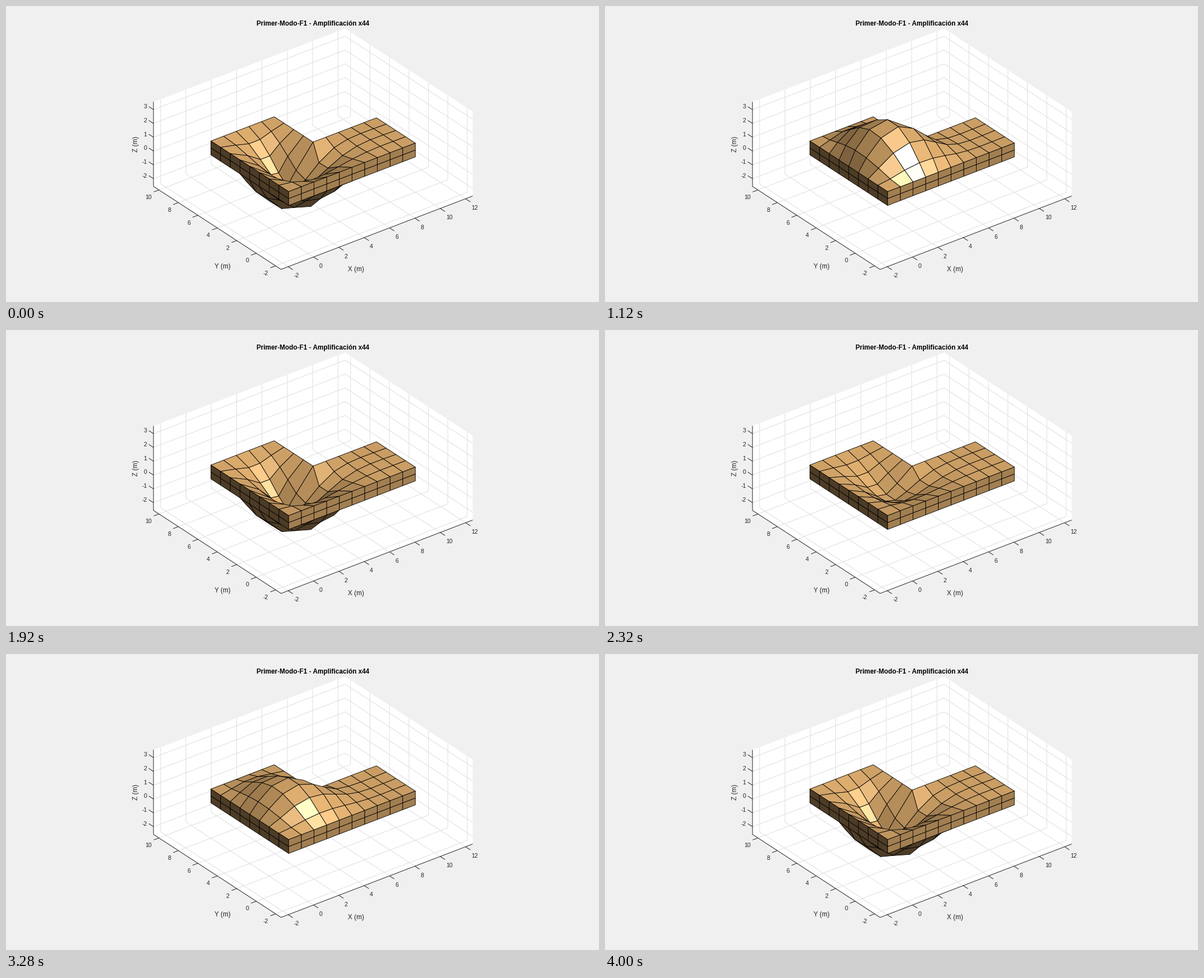
Recreate the animation shown at these times as a matplotlib script. Size 1058 by 529 pixels, loop 4080 ms.

```python
from itertools import product

import matplotlib.pyplot as plt
import numpy as np
from matplotlib.animation import FuncAnimation
from matplotlib.collections import LineCollection, PolyCollection

W, H, DPI = 1058, 529, 64
PX = 72 / DPI  # points per pixel
FRAMES, CYCLE, INTERVAL = 51, 25, 80

# Orthographic camera
SCALE = 28.5
CENTER = np.array([547.9, 255.5])
AZ, EL = np.radians([-37.5, 30])
RIGHT = np.array([np.cos(AZ), np.sin(AZ), 0])
UP = np.array([-np.sin(EL) * np.sin(AZ), np.sin(EL) * np.cos(AZ), np.cos(EL)])
VIEW = np.array([np.cos(EL) * np.sin(AZ), -np.cos(EL) * np.cos(AZ), np.sin(EL)])
MIDDLE = np.array([5, 4, 0.5])

# Light and material
LIGHT = np.array([0.1, -0.56, 0.815])
COPPER = np.array([1, 0.7812, 0.4975])
AMBIENT, DIFFUSE, SPECULAR, SHINE = 0.3, 0.6, 0.9, 10

INK = (0.15, 0.15, 0.15)
MARGIN = 2.56
SIZE = np.array([1, 1, 0.5])
LAYERS = 2


def project(p):
    q = (np.asarray(p, float) - MIDDLE) * SCALE
    return np.stack([CENTER[0] + q @ RIGHT, CENTER[1] - q @ UP], axis=-1)


# L-shaped plate of unit cells, two layers thick
cells = [(i, j) for i in range(10) for j in range(8) if i < 5 or j < 4]
plan = sorted({(i + a, j + b) for i, j in cells for a, b in product((0, 1), repeat=2)})
nodes = [(i, j, k) for i, j in plan for k in range(LAYERS + 1)]
index = {n: m for m, n in enumerate(nodes)}
rest = np.array(nodes) * SIZE


def is_inner(i, j):
    return all((i - a, j - b) in cells for a, b in product((0, 1), repeat=2))


def brick_stiffness(nu=0.25):
    """Stiffness of an eight-node brick, 2x2x2 Gauss points."""
    corners = np.array(list(product((-1, 1), repeat=3)))
    c = np.zeros((6, 6))
    c[:3, :3] = nu
    c[range(3), range(3)] = 1 - nu
    c[range(3, 6), range(3, 6)] = (1 - 2 * nu) / 2
    k = np.zeros((24, 24))
    for g in corners / np.sqrt(3):
        f = 1 + corners * g
        d = np.stack([corners[:, i] * f[:, (i + 1) % 3] * f[:, (i + 2) % 3]
                      / 4 / SIZE[i] for i in range(3)], axis=1)
        b = np.zeros((6, 24))
        for i in range(3):
            b[i, i::3] = d[:, i]
        for row, (i, j) in enumerate(((0, 1), (1, 2), (0, 2)), start=3):
            b[row, i::3] = d[:, j]
            b[row, j::3] = d[:, i]
        k += b.T @ c @ b
    return k


def first_mode():
    """Lowest vibration mode of the plate with a clamped rim."""
    n = len(nodes)
    stiff = np.zeros((3 * n, 3 * n))
    mass = np.zeros(n)
    brick = brick_stiffness()
    for (i, j), k in product(cells, range(LAYERS)):
        ids = [index[i + a, j + b, k + c] for a, b, c in product((0, 1), repeat=3)]
        dof = np.array([3 * m + d for m in ids for d in range(3)])
        stiff[np.ix_(dof, dof)] += brick
        mass[ids] += 1
    free = np.repeat([is_inner(i, j) for i, j, _ in nodes], 3)
    root = np.sqrt(np.repeat(mass, 3)[free])
    _, vecs = np.linalg.eigh(stiff[np.ix_(free, free)] / np.outer(root, root))
    shape = np.zeros(3 * n)
    shape[free] = vecs[:, 0] / root
    shape = shape.reshape(-1, 3)
    rise = shape[index[2, 3, 0]] @ UP * SCALE
    return shape * 57.1 / rise


def build_faces():
    """Outward-facing quads of the sides the camera can see."""
    quads = []
    for i, j in cells:
        ring = [(i, j), (i + 1, j), (i + 1, j + 1), (i, j + 1)]
        quads.append([index[a, b, LAYERS] for a, b in ring])
        quads.append([index[a, b, 0] for a, b in ring[::-1]])
        for k in range(LAYERS):
            if i == 0:
                quads.append([index[0, j, k], index[0, j, k + 1],
                              index[0, j + 1, k + 1], index[0, j + 1, k]])
            if j == 0:
                quads.append([index[i, 0, k], index[i + 1, 0, k],
                              index[i + 1, 0, k + 1], index[i, 0, k + 1]])
    return np.array(quads)


mode = first_mode()
faces = build_faces()


def shade(normal):
    lit = np.clip(normal @ LIGHT, 0, 1)
    mirror = np.clip(2 * lit * (normal @ VIEW) - LIGHT @ VIEW, 0, 1)
    gloss = SPECULAR * mirror ** SHINE
    rgb = COPPER * (AMBIENT + DIFFUSE * lit)[:, None] + gloss[:, None]
    return np.clip(rgb, 0, 1)


def pose(amp):
    """Visible quads from back to front, with their colours."""
    quads = (rest + amp * mode)[faces]
    normal = np.cross(quads[:, 2] - quads[:, 0], quads[:, 3] - quads[:, 1])
    normal /= np.linalg.norm(normal, axis=1, keepdims=True)
    order = np.argsort(quads.mean(axis=1) @ VIEW)
    order = order[(normal @ VIEW > 0)[order]]
    return project(quads[order]), shade(normal[order])


plt.rcParams["font.family"] = "Liberation Sans"
fig = plt.figure(figsize=(W / DPI, H / DPI), dpi=DPI, facecolor="#f0f0f0")
ax = fig.add_axes([0, 0, 1, 1])
ax.set(xlim=(0, W), ylim=(H, 0))
ax.axis("off")


def write(x, y, s, size=10.67, color=INK, **kw):
    ax.text(x, y + 0.36 * size, s, fontsize=size * PX, color=color,
            va="baseline", **kw)


def draw_axes():
    (x0, y0, z0), (x1, y1, z1) = -np.full(3, MARGIN), np.array([10, 8, 1]) + MARGIN
    hull = [(x0, y0, z0), (x1, y0, z0), (x1, y0, z1),
            (x1, y1, z1), (x0, y1, z1), (x0, y1, z0)]
    ax.add_patch(plt.Polygon(project(hull), fc="white", ec="none", zorder=0))

    grid, ticks = [], []

    def add_tick(at, out):
        p = project(at)
        step = project(np.add(at, out)) - p
        ticks.append([p, p + 10 * step / np.hypot(*step)])
        return p

    for x in range(-2, 13, 2):
        grid.append([(x, y0, z0), (x, y1, z0), (x, y1, z1)])
        p = add_tick((x, y0, z0), (0, -1, 0))
        write(p[0] + 10, p[1] + 15.5, str(x), ha="left")
    for y in range(-2, 11, 2):
        grid.append([(x0, y, z0), (x1, y, z0), (x1, y, z1)])
        p = add_tick((x0, y, z0), (-1, 0, 0))
        write(p[0] - 13, p[1] + 12.7, str(y), ha="right")
    for z in range(-2, 4):
        grid.append([(x0, y1, z), (x1, y1, z), (x1, y0, z)])
        p = add_tick((x0, y1, z), (0, 1, 0))
        write(p[0] - 11.7, p[1] - 5.8, str(z), ha="right")

    frame = project([(x1, y0, z0), (x0, y0, z0), (x0, y1, z0), (x0, y1, z1)])
    ax.add_collection(LineCollection([project(g) for g in grid], colors="#dfdfdf",
                                     linewidths=PX, zorder=1))
    ax.add_collection(LineCollection([frame] + ticks, colors=[INK],
                                     linewidths=PX, zorder=2))

    write(547.9, 30.5, "Primer-Modo-F1 - Amplificación x44", 11.75, "black",
          ha="center", weight="bold")
    write(624.5, 469.5, "X (m)", 11.73, ha="center")
    write(386, 464.5, "Y (m)", 11.73, ha="center")
    ax.text(232, 246.5, "Z (m)", fontsize=11.73 * PX, color=INK,
            ha="center", va="center", rotation=90)


draw_axes()
plate = PolyCollection([], edgecolors="black", linewidths=0.85 * PX, zorder=3)
ax.add_collection(plate)


def update(n):
    verts, colors = pose(-np.cos(2 * np.pi * n / CYCLE))
    plate.set_verts(verts)
    plate.set_facecolor(colors)
    return (plate,)


anim = FuncAnimation(fig, update, frames=FRAMES, interval=INTERVAL,
                     repeat=True, repeat_delay=0)
plt.show()
```
